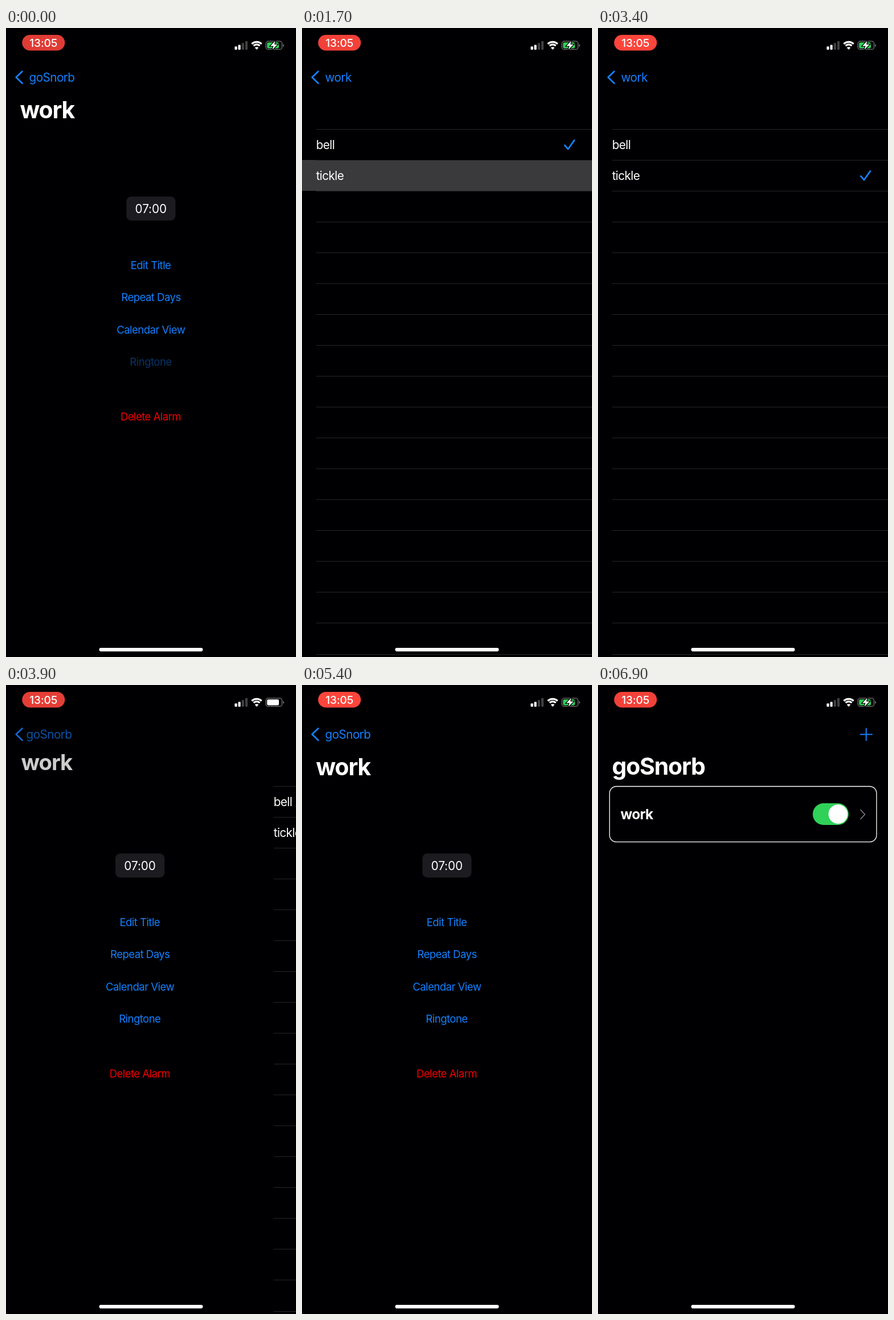
These frames come from a looping animation (509x1101 px, 7 s). An HTML page:

```html
<!DOCTYPE html>
<html lang="en">
<head>
<meta charset="utf-8">
<title>Alarm ringtone</title>
<style>
  html, body { margin: 0; width: 100%; height: 100%; overflow: hidden; background: #000002; }
  svg { display: block; width: 100%; height: 100%; }
  text { font: 400 20.8px Inter, sans-serif; letter-spacing: -.03em; fill: #fff; }
  .title { font-size: 41px; font-weight: 700; }
  .action { font-size: 18.6px; fill: #1480ff; text-anchor: middle; }
  .danger { fill: #f20000; }
  .name { font-size: 24.5px; font-weight: 700; }
  .page { fill: #000002; }
  .blue { fill: #1480ff; }
  .mid { text-anchor: middle; }
  .time { letter-spacing: -.005em; }
  .clock { font-size: 19.3px; font-weight: 500; letter-spacing: -.01em; }
  .stroke { fill: none; stroke: #1480ff; stroke-width: 2.8; stroke-linecap: round; stroke-linejoin: round; }
</style>
</head>
<body>
<svg viewBox="0 0 509 1101">
  <g id="root">
    <rect x="20.4" y="177.5" width="468.6" height="97.2" rx="12" fill="none" stroke="#fff" stroke-width="1.3"/>
    <text class="name" x="39.5" y="234.5">work</text>
    <rect x="377" y="207" width="63" height="38" rx="19" fill="#30d158"/>
    <circle cx="421.4" cy="226" r="16.8" fill="#fff"/>
    <path class="stroke" d="M461 218.5l7.5 8-7.5 8" style="stroke:#7c7c80;stroke-width:1.7"/>
  </g>

  <g id="alarm">
    <rect class="page" width="509" height="1101"/>
    <rect x="211.3" y="295" width="86.2" height="42" rx="8.5" fill="#1c1b1f"/>
    <text class="mid time" x="254.3" y="323.5">07:00</text>
    <text class="action" x="254" y="421.6">Edit Title</text>
    <text class="action" x="254.5" y="478.2">Repeat Days</text>
    <text class="action" x="254.3" y="534.8">Calendar View</text>
    <text class="action" x="254" y="591.4" id="ringtone">Ringtone</text>
    <text class="action danger" x="254" y="687.2">Delete Alarm</text>
  </g>

  <g id="list">
    <rect class="page" width="509" height="1101"/>
    <rect id="highlight" y="231" width="509" height="54" fill="#3a3a3c"/>
    <g id="lines" fill="#262628"></g>
    <text x="24.7" y="211.5">bell</text>
    <text x="24.7" y="265.5">tickle</text>
    <path id="check" class="stroke" d="M461.3 205.3l5.7 6.7 10.8-15.4"/>
  </g>

  <g id="nav">
    <path id="plus" class="stroke" d="M460.5 86.5h20.5M470.7 76v21" style="stroke-width:2"/>
    <path id="chevron" class="stroke" d="M28.5 76l-10.8 10.3 10.8 10.5"/>
    <text id="rootTitle" class="title">goSnorb</text>
    <text id="rootBack" class="blue">goSnorb</text>
    <text id="workTitle" class="title">work</text>
    <text id="workBack" class="blue">work</text>
  </g>

  <g id="status">
    <rect id="pill" x="28.3" y="12.1" width="75" height="27.4" rx="13.7"/>
    <text class="mid clock" x="65.7" y="33">13:05</text>
    <g fill="#fff">
      <rect x="401.4" y="32.3" width="4.2" height="5.7" rx="1"/>
      <rect x="407.5" y="29.6" width="4.2" height="8.4" rx="1"/>
      <rect x="413.7" y="26.3" width="4.2" height="11.7" rx="1" opacity=".25"/>
      <rect x="419.9" y="23" width="4.2" height="15" rx="1" opacity=".25"/>
      <path d="M440 38l-3.3-3.4a4.7 4.7 0 0 1 6.6 0z"/>
    </g>
    <g fill="none" stroke="#fff" stroke-width="3.2">
      <path d="M431.4 27.9a12.2 12.2 0 0 1 17.2 0"/>
      <path d="M434.6 31.1a7.6 7.6 0 0 1 10.8 0"/>
    </g>
    <rect x="456.2" y="23.2" width="28.3" height="14.2" rx="4" fill="none" stroke="#77777a" stroke-width="1.3"/>
    <path d="M486.3 28a2.6 2.6 0 0 1 0 5z" fill="#77777a"/>
    <rect id="charge" x="458.2" y="25.2" width="20.8" height="10.2" rx="2.2"/>
    <path id="bolt" d="M472.5 22.6l-8.5 8.9h5.5l-2 6.6 9-9.3H471z" fill="#fff" stroke="#000" stroke-width="2.4" paint-order="stroke"/>
  </g>
  <rect x="163.5" y="1085" width="182" height="6.2" rx="3.1" fill="#fff"/>
</svg>

<script>
const LOOP = 7000, STEP = 100, WIDTH = 509, PARALLAX = 153;
const PUSH = 50, POP_LIST = 3700, POP_ALARM = 6350;
const ui = Object.fromEntries([...document.querySelectorAll('[id]')].map(e => [e.id, e]));

for (let i = 0; i < 18; i++) {
  const line = document.createElementNS('http://www.w3.org/2000/svg', 'rect');
  const box = { x: 25, y: Math.round(177 + i * 54.03), width: 484, height: 1 };
  for (const key in box) line.setAttribute(key, box[key]);
  ui.lines.append(line);
}

const mix = (a, b, k) => a + (b - a) * k;
const clamp = v => Math.min(1, Math.max(0, v));
const within = (t, from, to) => t >= from && t < to;

// Critically damped spring from 0 to 1.
function spring(t, start) {
  const s = Math.max(0, t - start) * 0.018;
  return 1 - (1 + s) * Math.exp(-s);
}

function place(el, x, y = 0, scale = 1) {
  el.setAttribute('transform', `translate(${x.toFixed(2)} ${y.toFixed(2)}) scale(${scale.toFixed(3)})`);
}

function fade(el, opacity) {
  el.setAttribute('opacity', clamp(opacity).toFixed(3));
}

// Large title (k = 0) shrinks into the back label (k = 1).
function morph(title, back, k, shift, titleAlpha, backAlpha, backShift = 0) {
  const x = mix(24.5, 40.6, k), y = mix(157.5, 93.5, k);
  place(title, x + shift, y, mix(1, 0.5, k));
  place(back, x + backShift, y, mix(2, 1, k));
  fade(title, (1 - 1.6 * k) * titleAlpha);
  fade(back, (1.6 * k - 0.6) * backAlpha);
}

function pressed(t, from, to) {
  if (within(t, from, to)) return 0.4;
  return t < from ? 1 : mix(0.4, 1, clamp((t - to) / 300));
}

function draw(t) {
  const list = t < POP_LIST ? spring(t, PUSH) : 1 - spring(t, POP_LIST);
  const alarm = 1 - spring(t, POP_ALARM);
  const alarmShift = WIDTH * (1 - alarm);

  place(ui.root, -PARALLAX * alarm);
  place(ui.alarm, alarmShift - PARALLAX * list);
  place(ui.list, WIDTH * (1 - list));

  const press = pressed(t, 3500, POP_LIST) * pressed(t, 6200, POP_ALARM);
  morph(ui.workTitle, ui.workBack, list, alarmShift, alarm, press);
  morph(ui.rootTitle, ui.rootBack, alarm, 0, 1, press * (1 - 1.5 * list), -40 * list);
  fade(ui.chevron, alarm * press);
  fade(ui.plus, 1 - alarm);

  fade(ui.ringtone, mix(0.4, 1, clamp((t - PUSH) / 400)));
  fade(ui.highlight, t < 1700 ? 0 : 1 - (t - 1800) / 200);
  place(ui.check, 0, t < 1800 ? 0 : 54);

  const glow = (1 + Math.cos((t - 1300) / 1000 * Math.PI)) / 2;
  ui.pill.setAttribute('fill', `rgb(${mix(216, 255, glow)} ${mix(58, 69, glow)} ${mix(52, 59, glow)})`);

  const charging = !within(t, 3700, 5300);
  ui.charge.setAttribute('fill', charging ? '#30d158' : '#fff');
  fade(ui.bolt, charging ? 1 : 0);
}

const start = performance.now();
function tick() {
  const t = (performance.now() - start) % LOOP;
  draw(Math.floor(t / STEP) * STEP);
  requestAnimationFrame(tick);
}
tick();
</script>
</body>
</html>
```
